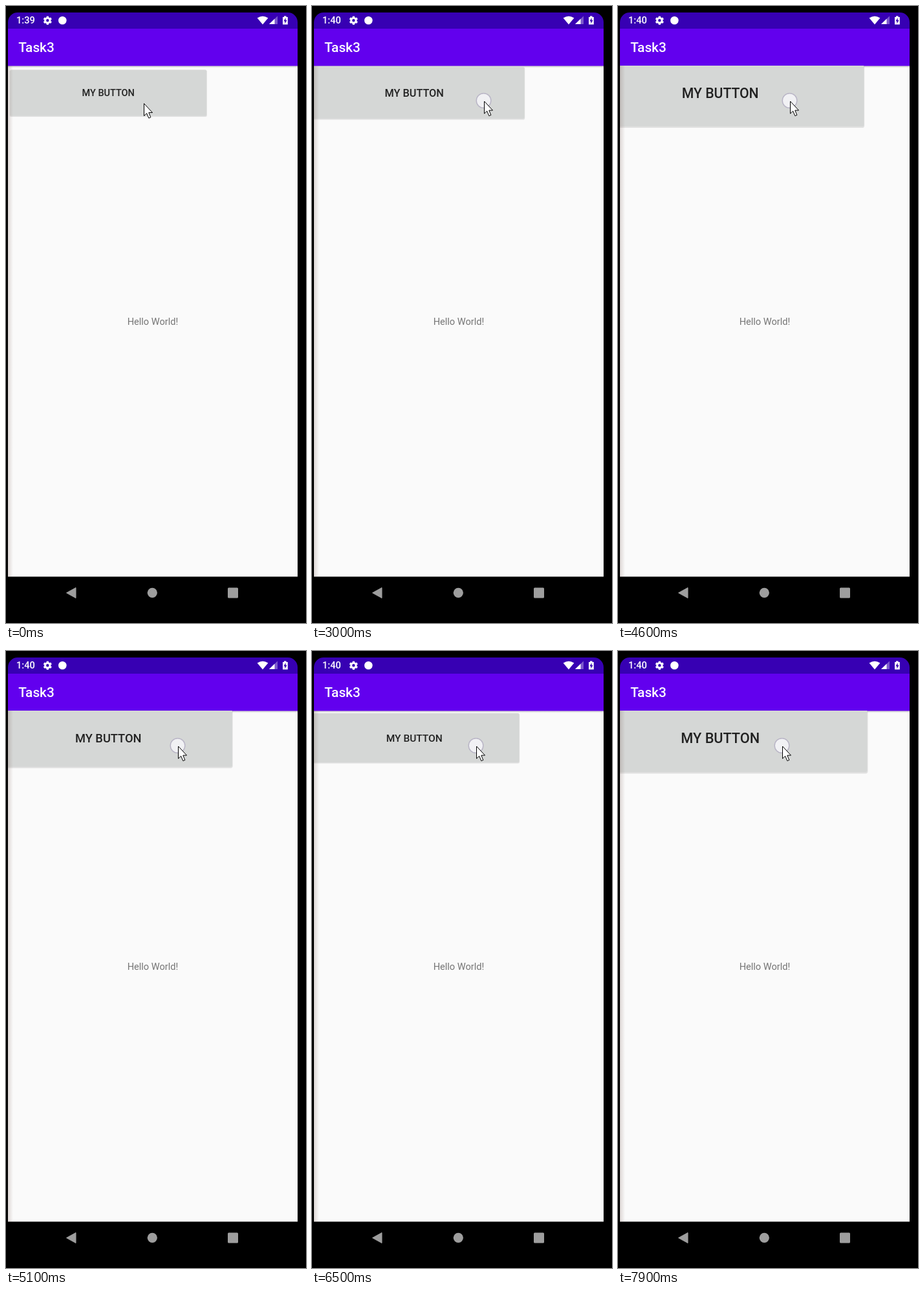
An HTML page that plays this animation: 464 px wide and 952 px high, repeating every 8000 ms.

```html
<!DOCTYPE html>
<html lang="en">
<head>
<meta charset="utf-8">
<title>Button animation</title>
<style>
  html, body { margin: 0; width: 100%; height: 100%; overflow: hidden; background: #000; }
  svg { display: block; width: 100%; height: 100%; }
  text { font-family: Roboto, "Noto Sans", sans-serif; }
  .medium { font-weight: 500; }
</style>
</head>
<body>
<svg viewBox="0 0 464 952">
  <defs>
    <clipPath id="screen"><path d="M3 881V25a15 15 0 0 1 15-15H436a15 15 0 0 1 15 15V881Z"/></clipPath>
    <clipPath id="content"><rect x="3" y="92" width="448" height="788.5"/></clipPath>
    <linearGradient id="barShade" x2="0" y2="1">
      <stop stop-color="#000" stop-opacity=".2"/>
      <stop offset="1" stop-color="#000" stop-opacity="0"/>
    </linearGradient>
    <linearGradient id="edgeShade">
      <stop stop-color="#6b4a40" stop-opacity=".2"/>
      <stop offset="1" stop-color="#6b4a40" stop-opacity="0"/>
    </linearGradient>
  </defs>

  <rect width="464" height="952"/>
  <g clip-path="url(#screen)">
    <rect x="3" y="92" width="448" height="788.5" fill="#fafafa"/>
    <rect x="3" y="10" width="448" height="25.5" fill="#3700b3"/>
    <rect x="3" y="35" width="448" height="57.5" fill="#6200ee"/>
    <rect x="3" y="92.5" width="448" height="3" fill="url(#barShade)"/>
  </g>

  <!-- status bar -->
  <g fill="#fff">
    <text id="clock" class="medium" x="16" y="27.3" font-size="14.6"></text>
    <g transform="translate(64.3 22.3)">
      <circle r="3.7" fill="none" stroke="#fff" stroke-width="3"/>
      <g id="teeth"></g>
    </g>
    <circle cx="87.3" cy="22.3" r="6.3"/>
    <path d="M388.6 18.6Q397 12.8 405.4 18.6L397 28.5Z"/>
    <path d="M407 28L420 15.5V28Z" opacity=".35"/>
    <path d="M407 28L415.5 19.8V28Z"/>
    <path d="M430 17V15.5H433.5V17H435.8V28.5H428V17Z"/>
    <path d="M432.6 18.3L429.4 23.4H431.4V27.2L434.5 22H432.6Z" fill="#3700b3"/>
  </g>
  <text class="medium" x="19.2" y="71.4" font-size="20.8" fill="#fff">Task3</text>

  <g clip-path="url(#content)">
    <g id="button">
      <rect x="-152.6" y="-35.2" width="305.2" height="72.2" rx="2.5" fill="#000" opacity=".1"/>
      <rect x="-152" y="-35.5" width="304" height="71" rx="2" fill="#d5d7d6"/>
      <text class="medium" y="5.2" font-size="14.5" fill="#212121" text-anchor="middle">MY BUTTON</text>
    </g>
    <rect x="3" y="92" width="8" height="789" fill="url(#edgeShade)"/>
    <text x="227" y="492.4" font-size="14.6" fill="#757575" text-anchor="middle">Hello World!</text>
  </g>

  <!-- navigation bar -->
  <g fill="#9e9e9e">
    <path d="M93.5 905.5L108 897.5V913.5Z" stroke="#9e9e9e" stroke-linejoin="round"/>
    <circle cx="226.3" cy="905.3" r="7.6"/>
    <rect x="343" y="897.5" width="16" height="16" rx="1.5"/>
  </g>

  <g id="pointer">
    <circle id="touch" cx="-.5" cy="-.5" r="11.3" fill="#f5f5f8" fill-opacity=".88" stroke="#b9b5c6" stroke-width="1.5"/>
    <path d="M.5 .5V19.5L4.7 15.6L7.8 23L10.8 21.8L7.8 14.5H13.5Z" fill="#fff" stroke="#000"/>
  </g>
</svg>

<script>
const LOOP = 8000, STEP = 100;
const $ = id => document.getElementById(id);

for (let i = 0; i < 6; i++) {
  $('teeth').insertAdjacentHTML('beforeend',
    `<rect x="-1.6" y="-6.6" width="3.2" height="3" transform="rotate(${i * 60})"/>`);
}

// [time, phase]: 0 at rest, 1 fully grown, 2 back at rest
const PHASES = [
  [2330, 0], [3200, 0.425], [4100, 0.745], [4600, 1.18],
  [5000, 1.385], [5500, 1.89], [5700, 2], [6020, 2], [8020, 3]
];
// [time, x, y]
const MOVES = [[0, 213, 150], [1400, 213, 147], [2100, 252, 146.5], [2200, 266, 146.5], [5400, 265, 146.5], [6100, 254, 146.5]];

function phaseAt(t) {
  if (t <= PHASES[0][0]) return 0;
  const i = PHASES.findIndex(p => p[0] > t);
  const [t0, a] = PHASES[i - 1], [t1, b] = PHASES[i];
  return a + (b - a) * (t - t0) / (t1 - t0);
}

function draw(t) {
  const scale = 1 + 0.25 * (1 - Math.cos(Math.PI * phaseAt(t)));
  $('button').setAttribute('transform', `translate(158.2 134) scale(${scale})`);
  const [, x, y] = MOVES.filter(m => m[0] <= t).pop();
  $('pointer').setAttribute('transform', `translate(${x} ${y})`);
  const pressed = (t >= 2400 && t < 5400) || t >= 6100;
  $('touch').setAttribute('visibility', pressed ? 'visible' : 'hidden');
  $('clock').textContent = t < 1000 ? '1:39' : '1:40';
}

const start = performance.now();
function tick() {
  const t = (performance.now() - start) % LOOP;
  draw(Math.floor(t / STEP) * STEP);
  requestAnimationFrame(tick);
}
tick();
</script>
</body>
</html>
```
